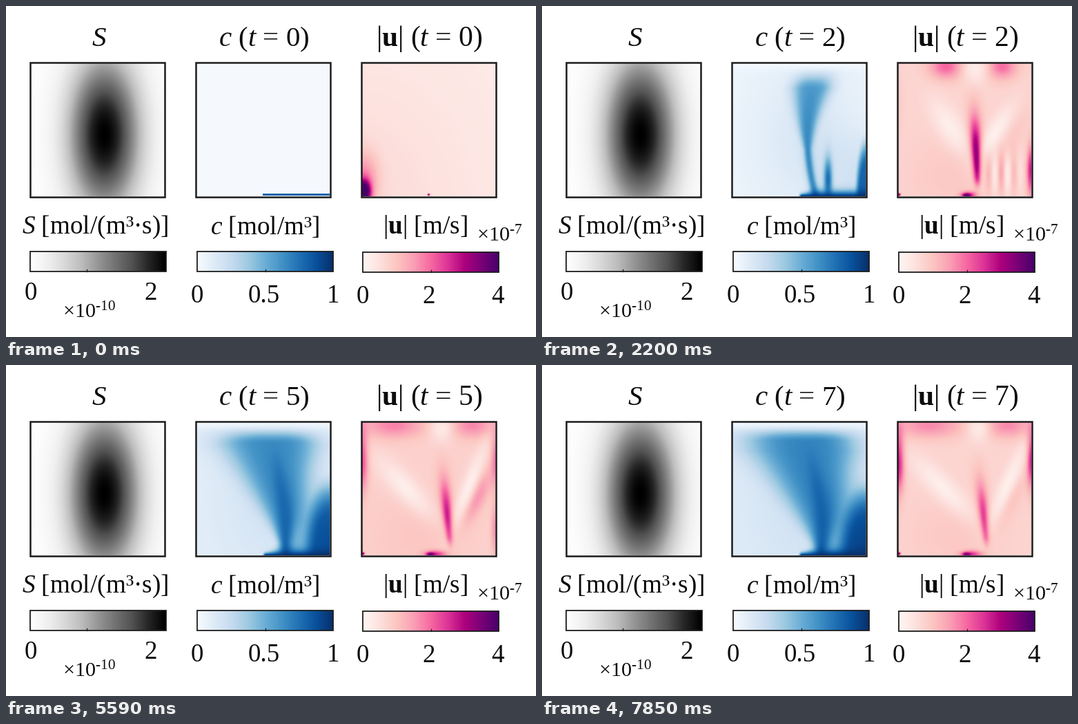
These frames come from a looping animation (768x480 px, 8000 ms). A matplotlib script:

```python
import numpy as np
import matplotlib.pyplot as plt
from matplotlib.animation import FuncAnimation
from matplotlib.patches import Rectangle

W, H = 768, 480
STEP, LOOP = 20, 8000
FIRST, HOLD = 1070, 1130     # first picture, then one every HOLD ms
N = 193                      # field size in pixels
INK = "#1c1c1c"

plt.rcParams.update({
    "font.family": "Liberation Serif",
    "mathtext.fontset": "custom",
    "mathtext.rm": "Liberation Serif",
    "mathtext.it": "Liberation Serif:italic",
    "mathtext.bf": "Liberation Serif:bold",
})

y, x = np.mgrid[0:N, 0:N].astype(float)


def blob(cx, cy, sx, sy, tilt=0):
    """Gaussian spot; tilt in degrees, positive runs down to the right."""
    a = np.radians(tilt)
    dx, dy = x - cx, y - cy
    u = dx * np.cos(a) + dy * np.sin(a)
    v = dy * np.cos(a) - dx * np.sin(a)
    return np.exp(-0.5 * ((u / sx) ** 2 + (v / sy) ** 2))


def smooth(v, lo, hi):
    s = np.clip((v - lo) / (hi - lo), 0, 1)
    return s * s * (3 - 2 * s)


def over(*parts):
    rest = 1.0
    for p in parts:
        rest = rest * (1 - p)
    return 1 - rest


def source():
    return blob(106, 103, 37, 80)


def concentration(t):
    if t == 0:
        c = np.full((N, N), 0.008)
        c[-4:-1, 96:] = 0.8
        return c

    def mix(*v):
        return np.interp(t, (1, 2, 4, 7), v)

    haze = mix(.03, .05, .09, .12) + mix(.11, .1, .08, .08) * blob(110, 110, 55, 80)
    haze = haze * (0.3 + 0.7 * smooth(y, 0, 16))

    # rising plume: a thin stem that opens into a wide head
    bend = np.polyfit((192, 105, 40), (mix(115, 120, 129, 128),
                                       mix(104, 108, 122, 123),
                                       mix(98, 114, 114, 112)), 2)
    mid = np.polyval(bend, y)
    d = np.abs(x - mid)
    wide, narrow = mix(60, 36, 32, 40), mix(150, 125, 170, 185)
    flare = np.clip((narrow - y) / (narrow - wide), 0, 1)
    stem = mix(6, 6, 9, 9)
    head = mix(9, 29, 72, 90) * np.where(x > mid, mix(1, 1, .85, .77), 1)
    half = stem + (head - stem) * flare ** 1.15
    rise = smooth(y, mix(50, 2, 1, 1), mix(150, 38, 32, 28))
    plume = mix(.65, .54, .58, .61) * rise * np.exp(-(d / half) ** (2 + flare))
    spine = mix(0, .1, .28, .28) * np.exp(-(d / 10) ** 2) * smooth(y, 20, 100)

    # dense layer on the floor and the fingers growing from it
    edge = smooth(x, 94, 100)
    depth = mix(13, 8, 7, 8) * (0.4 + 0.6 * smooth(x, 94, 125))
    bed = .93 * edge * np.exp(-((N - 1 - y) / depth) ** 1.5)
    finger1 = mix(.7, .72, 0, 0) * blob(mix(144, 138, 136, 136),
                                        mix(172, 168, 165, 165), 4.5, mix(15, 23, 25, 25))
    finger2 = mix(.65, 0, 0, 0) * blob(163, 174, 4.5, 14)

    # hump along the right wall
    r = np.hypot((N - x) / mix(9, 14, 32, 36), (N - y) / mix(25, 75, 100, 88))
    hump = mix(.5, .75, .66, .68) * (1 - smooth(r, .6, 1.3))
    corner = mix(0, .1, .3, .6) * blob(N, N, 24, 45)
    fill = mix(0, .06, .34, .36) * smooth(x, mid - 8, mid + 12) * smooth(y, 60, 150)
    return over(haze, plume, spine, bed, finger1, finger2, hump, corner, fill)


def speed(t):
    if t == 0:
        return (.07 + .07 * blob(0, 192, 110, 130) + .95 * blob(2, 187, 7, 12)
                + .3 * blob(3, 168, 14, 28) + .8 * blob(96, 190, 1.2, 1.2))

    def mix(*v):
        return np.interp(t, (1, 2, 4, 7), v)

    u = mix(.15, .18, .2, .18) + .05 * blob(80, 165, 45, 40)

    # pink along the top and the side walls
    u = u + mix(.05, .33, .25, .24) * blob(mix(69, 69, 46, 45), 4, mix(20, 17, 30, 34), 13)
    u = u + mix(.05, .31, .23, .24) * blob(mix(150, 150, 160, 158), 4, mix(18, 15, 22, 26), 13)
    u = u + mix(0, .03, .3, .52) * blob(0, mix(60, 55, 52, 56), 6, 32)
    u = u + mix(0, 0, .1, .52) * blob(N, 50, 5, 30)
    u = u + mix(.03, .5, .3, 0) * blob(N - 1, 155, 4, 25)
    u = u + mix(0, .05, .27, .08) * blob(167, 107, 30, 9, -65)
    u = u + (mix(.16, .14, 0, 0) * np.cos(2 * np.pi * (x - 149) / 19)
             * blob(150, mix(165, 160, 160, 160), 20, mix(15, 20, 20, 20)))

    # pale bands of still fluid
    left = blob(mix(92, 75, 62, 65), mix(135, 92, 95, 95), mix(28, 32, 38, 42),
                mix(8, 13, 12, 12), mix(72, 58, 48, 45))
    right = blob(mix(126, 140, 152, 158), mix(125, 100, 95, 90), mix(35, 32, 45, 44),
                 mix(6, 9, 7, 8), mix(-80, -58, -70, -66))
    top = blob(mix(106, 111, 114, 116), 8, 12, 15)
    u = u * (1 - .75 * left) * (1 - .78 * right) * (1 - .7 * top)

    # fast core of the plume
    x0, x1 = mix(104, 110, 117, 117), mix(114, 115, 127, 128)
    mid = x0 + (x1 - x0) * (y - 70) / 110
    half = np.maximum(4.4, 5 + .05 * (180 - y))
    swell = np.exp(-0.5 * ((y - mix(142, 130, 134, 137)) / mix(38, 38, 38, 37)) ** 2)
    swell = swell * (1 - smooth(y, 165, 190))
    u = u + mix(.62, .68, .52, .43) * swell * np.exp(-((x - mid) / half) ** 2)

    # hot spots on the floor
    u = u + mix(.5, .45, .42, .4) * blob(mix(102, 102, 106, 106), 191, mix(6, 8, 11, 11), 4)
    u = u + .4 * blob(98, 191, 4, 2) + .7 * blob(1, 190, 1.5, 1.5)
    return u


fig = plt.figure(figsize=(8, 5), dpi=96, facecolor="white")
ax = fig.add_axes([0, 0, 1, 1])
ax.axis("off")


def picture(data, left, top, w, h, cmap):
    return ax.imshow(data, extent=(left, left + w, top + h, top), cmap=cmap,
                     vmin=0, vmax=1, aspect="auto", interpolation="nearest")


def frame(left, top, w, h, px):
    ax.add_patch(Rectangle((left, top), w, h, fill=False, ec=INK, lw=px * .75))


def label(cx, base, s, px):
    return ax.text(cx, base, s, size=px * .75, color="#0c0c0c",
                   ha="center", va="baseline")


def panel(left, data, cmap):
    im = picture(data, left + 1, 83, N, N, cmap)
    frame(left, 82, 195.4, 195, 2.5)
    return im


def colorbar(left, top, cmap, tick):
    picture(np.linspace(0, 1, 197)[None], left, top, 197, 29, cmap)
    frame(left, top, 197, 29, 1.8)
    ax.plot([left + tick] * 2, [top + 26, top + 29], color=INK, lw=1)


c_fields = [np.clip(concentration(t), 0, 1) for t in range(8)]
u_fields = [np.clip(speed(t), 0, 1) for t in range(8)]

panel(35, source(), "Greys")
c_im = panel(275, c_fields[0], "Blues")
u_im = panel(515, u_fields[0], "RdPu")

colorbar(35, 356, "Greys", 82)
colorbar(277, 356, "Blues", 98.5)
colorbar(517, 357, "RdPu", 98.5)

label(135, 58, "$S$", 41)
c_title = label(373.5, 58, "", 41)
u_title = label(613.5, 58, "", 41.5)

label(129, 330, "$S$ [mol/(m³·s)]", 37.3)
label(375.5, 331, "$c$ [mol/m³]", 37.3)
label(607.5, 330, r"|$\mathbf{u}$| [m/s]", 37.3)

for cx, base, s in ((36, 426, "0"), (210, 426, "2"),
                    (277, 430, "0"), (374, 430, "0.5"), (474, 430, "1"),
                    (516.5, 431, "0"), (613, 431, "2"), (713, 431, "4")):
    label(cx, base, s, 37)
label(120.5, 452, r"×10$^{\text{-10}}$", 30.3)
label(715, 341, r"×10$^{\text{-7}}$", 30.3)

floor_line, = ax.plot([13, 754], [479.5, 479.5], color="#f3f3f3", lw=.75)

ax.set_xlim(0, W)
ax.set_ylim(H, 0)


def draw(n):
    # each picture is held, then cut to the next
    ms = n * STEP + STEP / 2
    t = 0 if ms < FIRST else 1 + int((ms - FIRST) // HOLD)
    c_im.set_data(c_fields[t])
    u_im.set_data(u_fields[t])
    c_title.set_text(f"$c$ ($t$ = {t})")
    u_title.set_text(rf"|$\mathbf{{u}}$| ($t$ = {t})")
    floor_line.set_visible(t == 0)
    return c_im, u_im, c_title, u_title, floor_line


anim = FuncAnimation(fig, draw, frames=LOOP // STEP, interval=STEP,
                     repeat=True, repeat_delay=0, blit=False)
plt.show()
```
